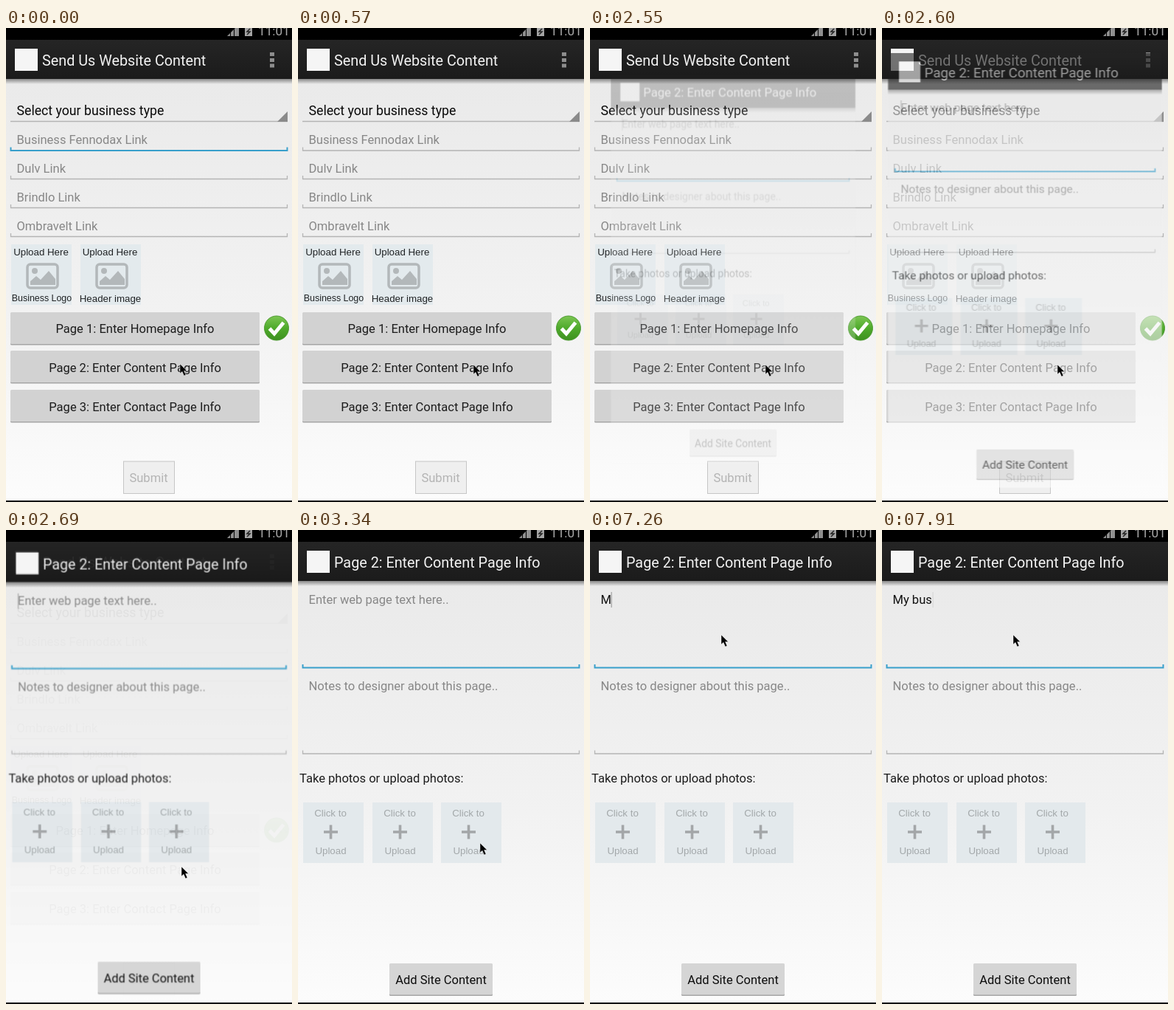
Animation of 388x642 px, one loop 8 s. Source, as an HTML page:

```html
<!DOCTYPE html>
<html lang="en">
<head>
<meta charset="utf-8">
<title>Website content form</title>
<style>
  html, body { margin: 0; width: 100%; height: 100%; overflow: hidden; background: #000; }
  svg { display: block; width: 388px; height: 642px; }
  text { font: 16.55px Roboto, sans-serif; fill: #1c1c1c; white-space: pre; }
  .title { font-size: 19.8px; fill: #f3f3f3; }
  .select { font-size: 17.7px; fill: #0a0a0a; }
  .hint { fill: #878787; }
  .mid { text-anchor: middle; }
  .thumb text { font: 13.3px "Liberation Sans", Arial, sans-serif; fill: #202325; text-anchor: middle; }
  .thumb .small { font-size: 12.4px; }
  .add text { fill: #a3a8aa; }
  .line { fill: none; stroke: #b4b4b4; stroke-width: 1.3; }
  .focus { stroke: #389fcb; stroke-width: 2; }

  .focus-out, .page, .mouse, .caret, .prompt, .typed tspan {
    animation: 8s step-end infinite;
  }
  .focus-out { animation-name: blur; }
  /* variables keep the scaled text sharp: it is redrawn at every step */
  .page {
    animation-name: open;
    transform-origin: 194px 316px;
    transform: scale(var(--size));
    opacity: var(--fade);
  }
  .mouse { animation-name: mouse; }
  .caret { animation-name: caret; }
  .prompt { animation-name: prompt; }
  .typed tspan { fill: #111; }
  .typed .c1 { animation-name: c1; }
  .typed .c2 { animation-name: c2; }
  .typed .c3 { animation-name: c3; }
  .typed .c4 { animation-name: c4; }
  .typed .c5 { animation-name: c5; }

  @keyframes blur {
    0% { stroke: #389fcb; stroke-width: 2px; }
    7.125%, 100% { stroke: #b4b4b4; stroke-width: 1.3px; }
  }
  @keyframes open {
    0% { --fade: 0; --size: .8; }
    31.875% { --fade: .22; --size: .84; }
    32.5% { --fade: .62; --size: .94; }
    33.625% { --fade: .96; --size: .992; }
    34.75% { --fade: .99; --size: .998; }
    35.875%, 100% { --fade: 1; --size: 1; }
  }
  @keyframes mouse {
    0% { transform: translate(236px, 455px); }
    4.5% { transform: translate(238px, 456px); }
    41% { transform: translate(240px, 451px); }
    41.75% { transform: translate(247px, 424px); }
    42.5% { transform: translate(248px, 368px); }
    43.25% { transform: translate(247px, 308px); }
    44% { transform: translate(239px, 250px); }
    44.75% { transform: translate(213px, 200px); }
    45.5% { transform: translate(188px, 135px); }
    46.25% { transform: translate(184px, 141px); }
    50.625% { transform: translate(183px, 141px); }
    51.375% { transform: translate(182px, 141px); }
    52.125% { transform: translate(180px, 142px); }
    52.875% { transform: translate(179px, 142px); }
    53.625%, 100% { transform: translate(178px, 142px); }
  }
  @keyframes caret {
    0% { opacity: 1; transform: none; }
    35.875% { opacity: 0; transform: none; }
    90.75% { opacity: 1; transform: translateX(14px); }
    93.75% { opacity: 1; transform: translateX(22px); }
    95% { opacity: 1; transform: translateX(26px); }
    96.25% { opacity: 1; transform: translateX(36px); }
    97.625% { opacity: 1; transform: translateX(45px); }
    98.875%, 100% { opacity: .25; transform: translateX(54px); }
  }
  @keyframes prompt { 0% { fill-opacity: 1; } 90.75%, 100% { fill-opacity: 0; } }
  @keyframes c1 { 0% { fill-opacity: 0; } 90.75%, 100% { fill-opacity: 1; } }
  @keyframes c2 { 0% { fill-opacity: 0; } 93.75%, 100% { fill-opacity: 1; } }
  @keyframes c3 { 0% { fill-opacity: 0; } 96.25%, 100% { fill-opacity: 1; } }
  @keyframes c4 { 0% { fill-opacity: 0; } 97.625%, 100% { fill-opacity: 1; } }
  @keyframes c5 { 0% { fill-opacity: 0; } 98.875%, 100% { fill-opacity: 1; } }
</style>
</head>
<body>
<svg viewBox="0 0 388 642" xmlns="http://www.w3.org/2000/svg">
  <defs>
    <linearGradient id="paper" x2="0" y2="1">
      <stop stop-color="#eaeaea"/><stop offset=".55" stop-color="#f2f2f2"/><stop offset="1" stop-color="#fcfcfc"/>
    </linearGradient>
    <linearGradient id="dark" x2="0" y2="1">
      <stop stop-color="#252525"/><stop offset="1" stop-color="#1b1b1b"/>
    </linearGradient>
    <linearGradient id="shade" x2="0" y2="1">
      <stop stop-opacity=".42"/><stop offset="1" stop-opacity="0"/>
    </linearGradient>
    <linearGradient id="green" x2="0" y2="1">
      <stop stop-color="#7cc653"/><stop offset=".5" stop-color="#4faa2c"/><stop offset="1" stop-color="#3d9120"/>
    </linearGradient>

    <!-- slightly wider than the stage, which shows while the page is scaled -->
    <g id="sheet">
      <rect x="-3.5" y="16" width="395" height="53" fill="url(#dark)"/>
      <rect x="-3.5" y="69" width="395" height="573" fill="url(#paper)"/>
      <rect x="-3.5" y="69" width="395" height="7" fill="url(#shade)"/>
      <rect x="12" y="28" width="31" height="30" fill="#f5f5f5"/>
    </g>
    <path id="field" d="M6.5 0v4.5h375v-4.5"/>
    <g id="wide">
      <rect x="6" y="1.5" width="338" height="43" rx="1.5" fill="#a5a5a5"/>
      <rect x="6" width="338" height="43" rx="1.5" fill="#d2d2d2"/>
    </g>
    <g id="photo">
      <rect width="82" height="82" fill="#e3eaed"/>
      <rect x="22" y="27" width="41" height="32" rx="4" fill="none" stroke="#b3b8ba" stroke-width="3.5"/>
      <circle cx="32" cy="36" r="4" fill="#b3b8ba"/>
      <path d="M26 55v-5l8-7 6 5 11-12 9 11v8z" fill="#b3b8ba"/>
    </g>
    <g id="add" class="add thumb">
      <rect width="82" height="82" fill="#e3e9ec"/>
      <path d="M28 40h19M37.5 30.5v19" stroke="#a3a6a8" stroke-width="3.6"/>
      <text x="37" y="18.5">Click to</text>
      <text x="37.5" y="70">Upload</text>
    </g>
  </defs>

  <rect width="388" height="642"/>

  <!-- main form -->
  <g>
    <use href="#sheet"/>
    <text class="title" x="49" y="51">Send Us Website Content</text>
    <g fill="#8d8d8d">
      <rect x="358" y="33" width="6" height="5"/>
      <rect x="358" y="41" width="6" height="5"/>
      <rect x="358" y="48.5" width="6" height="5"/>
    </g>

    <text class="select" x="14.5" y="118">Select your business type</text>
    <path d="M6 126.5h376" class="line"/>
    <path d="M382 113v14h-14z" fill="#8a8a8a"/>

    <text class="hint" x="14.5" y="157">Business Fennodax Link</text>
    <text class="hint" x="14.5" y="196">Dulv Link</text>
    <text class="hint" x="14.5" y="235">Brindlo Link</text>
    <text class="hint" x="14.5" y="274">Ombravelt Link</text>
    <use href="#field" y="161.5" class="line focus-out"/>
    <use href="#field" y="200" class="line"/>
    <use href="#field" y="239" class="line"/>
    <use href="#field" y="278" class="line"/>

    <g class="thumb">
      <use href="#photo" x="7" y="293"/>
      <use href="#photo" x="101" y="293"/>
      <text x="47.5" y="308">Upload Here</text>
      <text x="141" y="308">Upload Here</text>
      <text class="small" x="48.5" y="370">Business Logo</text>
      <text x="141.5" y="371">Header image</text>
    </g>

    <use href="#wide" y="385"/>
    <use href="#wide" y="437"/>
    <use href="#wide" y="490"/>
    <text class="mid" x="175" y="413">Page 1: Enter Homepage Info</text>
    <text class="mid" x="175" y="466">Page 2: Enter Content Page Info</text>
    <text class="mid" x="175" y="519">Page 3: Enter Contact Page Info</text>

    <circle cx="367" cy="406.5" r="16.5" fill="url(#green)" stroke="#4c9a30"/>
    <path d="M357.5 407l6.5 7 12.5-15" fill="none" stroke="#fff" stroke-width="5"/>

    <rect x="159.5" y="587" width="69" height="43.5" fill="#efefef" stroke="#c6c6c6"/>
    <text class="mid" x="193.5" y="615" style="fill:#b4b4b4">Submit</text>
  </g>

  <!-- second page -->
  <g class="page">
    <use href="#sheet"/>
    <text class="title" x="49" y="51">Page 2: Enter Content Page Info</text>

    <text class="hint prompt" x="14.5" y="100">Enter web page text here..</text>
    <text class="typed" x="14.5" y="100"><tspan class="c1">M</tspan><tspan class="c2">y</tspan><tspan class="c3"> b</tspan><tspan class="c4">u</tspan><tspan class="c5">s</tspan></text>
    <rect class="caret" x="14.5" y="84" width="1.3" height="21" fill="#a5a5a5"/>
    <use href="#field" y="182" class="line focus"/>
    <text class="hint" x="14.5" y="217">Notes to designer about this page..</text>
    <use href="#field" y="298.5" class="line"/>

    <text x="2" y="342">Take photos or upload photos:</text>
    <use href="#add" x="7" y="369"/>
    <use href="#add" x="101" y="369"/>
    <use href="#add" x="194" y="369"/>

    <rect x="124" y="589" width="140" height="42" rx="1.5" fill="#a5a5a5"/>
    <rect x="124" y="587" width="140" height="42.5" rx="1.5" fill="#d5d5d5"/>
    <text class="mid" x="194" y="615" style="fill:#0c0c0c">Add Site Content</text>
  </g>

  <!-- status bar and lower edge -->
  <rect width="388" height="16"/>
  <path d="M300 11l16-16v16z" fill="#8f8f8f"/>
  <path d="M304.5 0v12M309.5 0v12" stroke="#000"/>
  <path d="M324 0h10v11h-10z" fill="#a4a4a4"/>
  <path d="M331 1l-4 4h4l-4 4" fill="none" stroke="#222" stroke-width="1.5"/>
  <text x="342" y="10" style="font-size:17.2px;fill:#a8a8a8">11:01</text>
  <rect y="640" width="388" height="2"/>

  <path class="mouse" d="M0 0v13l3-2.7 2.5 5.7 2.5-1.1-2.4-5.4h4z" stroke="#fff" stroke-opacity=".65" stroke-width=".7"/>
</svg>
</body>
</html>
```
